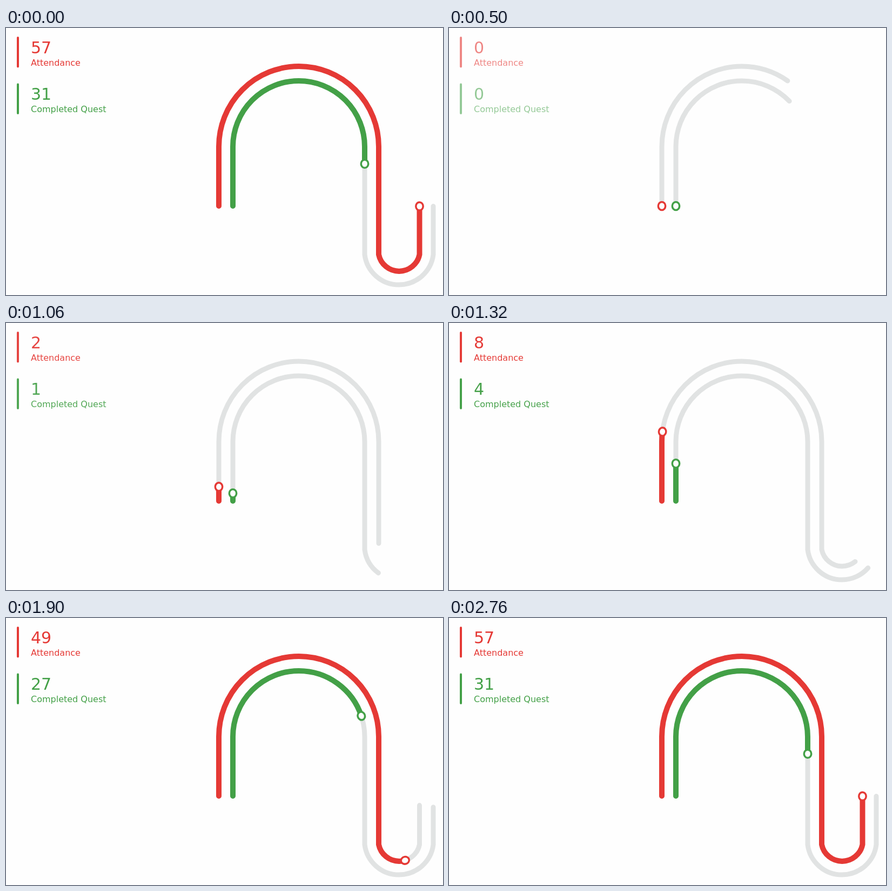
Write an HTML page that moves like this. It is 809 px wide and 495 px high and loops after 5.56 s.

```html
<!DOCTYPE html>
<html>
<head>
<meta charset="utf-8">
<style>
html, body { margin: 0; width: 100%; height: 100%; overflow: hidden; background: #fefefe; }
svg { display: block; font-family: "DejaVu Sans", sans-serif; }
path { fill: none; stroke-linecap: round; }
.track { stroke: #e1e3e3; stroke-width: 9; }
.bar { stroke-width: 10; }
.knob { fill: #fefefe; stroke-width: 3.5; }
</style>
</head>
<body>
<svg id="stage" width="809" height="495" viewBox="0 0 809 495"></svg>
<script>
const LOOP = 5560, HOLD = 60;
const stage = document.getElementById('stage');

const series = [
  { label: 'Attendance', value: 57, share: 1, color: '#e53935', y: 0, delay: 53,
    d: 'M394 330V220A148 149 0 0 1 690 220V420A38.5 38.5 0 0 0 765.5 420V330.5' },
  { label: 'Completed Quest', value: 31, share: .5425, color: '#43a047', y: 86.4, delay: 93,
    d: 'M420 330V220A122 122 0 0 1 664 220V420A64 64 0 0 0 791 420V330.5' }
];

function add(parent, tag, attrs, text = '') {
  const el = document.createElementNS('http://www.w3.org/2000/svg', tag);
  for (const key in attrs) el.setAttribute(key, attrs[key]);
  el.textContent = text;
  return parent.appendChild(el);
}

for (const s of series) {
  s.legend = add(stage, 'g', { fill: s.color, transform: `translate(0 ${s.y})` });
  add(s.legend, 'rect', { x: 20, y: 16, width: 4, height: 57.5, rx: 2 });
  s.count = add(s.legend, 'text', { x: 46, y: 47, 'font-size': 30 });
  add(s.legend, 'text', { x: 46, y: 70, 'font-size': 16 }, s.label);
  s.track = add(stage, 'path', { d: s.d, class: 'track' });
  s.length = s.track.getTotalLength();
}
for (const s of series) {
  s.bar = add(stage, 'path', { d: s.d, class: 'bar', stroke: s.color });
  s.knob = add(stage, 'ellipse', { rx: 6.7, ry: 7.6, class: 'knob', stroke: s.color });
}

const clamp = u => Math.min(1, Math.max(0, u));
const outCubic = u => 1 - (1 - u) ** 3;
const inOutQuint = u => u < .5 ? 16 * u ** 5 : 1 - 16 * (1 - u) ** 5;

function reveal(path, length) {
  path.setAttribute('stroke-dasharray', `${length} 2000`);
}

function draw(t) {
  const progress = inOutQuint(clamp((t - 362) / 2500));
  for (const s of series) {
    const since = t - s.delay;
    s.track.style.visibility = since > 0 ? 'visible' : 'hidden';
    reveal(s.track, s.length * outCubic(clamp(since / 2500)));
    s.legend.setAttribute('opacity', outCubic(clamp(since / 1700)));
    s.count.textContent = Math.round(s.value * progress);

    const at = s.length * s.share * progress;
    reveal(s.bar, at);
    const p = s.track.getPointAtLength(at);
    const a = s.track.getPointAtLength(at - .5), b = s.track.getPointAtLength(at + .5);
    const angle = Math.atan2(b.x - a.x, a.y - b.y) * 180 / Math.PI;
    s.knob.setAttribute('transform', `translate(${p.x} ${p.y}) rotate(${angle})`);
  }
}

let start;
function frame(now) {
  start ??= now;
  const t = (now - start) % LOOP;
  draw(t < HOLD ? t + LOOP : t);
  requestAnimationFrame(frame);
}
draw(LOOP);
requestAnimationFrame(frame);
</script>
</body>
</html>
```
